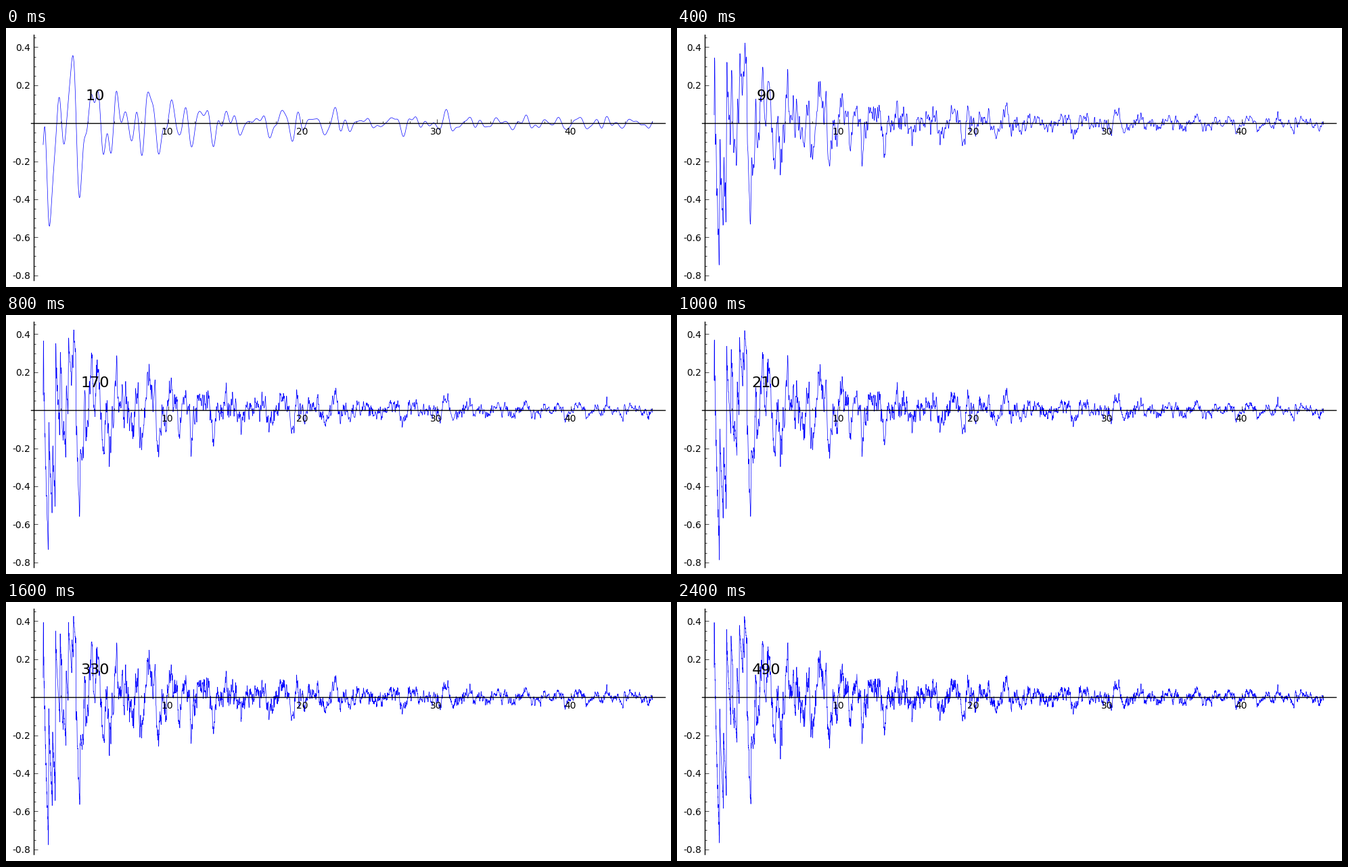
A matplotlib script that plays this animation: 983x384 px, repeating every 2600 ms.

```python
import numpy as np
import matplotlib.pyplot as plt
from matplotlib.animation import FuncAnimation
from matplotlib.ticker import MultipleLocator

WIDTH, HEIGHT, DPI = 983, 384, 100
CONDUCTOR = 433          # elliptic curve y^2 + xy = x^3 + 1, rank 2
RANK = 2
COUNTS = range(10, 500, 40)


def trace(p):
    """Trace of Frobenius at p, by counting points."""
    if p == 2:
        return -1
    x = np.arange(p, dtype=np.int64)
    chi = -np.ones(p, dtype=int)
    chi[x * x % p] = 1
    chi[0] = 0
    return -int(chi[(4 * x**3 + x**2 + 4) % p].sum())


def coefficients(limit):
    """Multiplicative coefficients a[0..limit] of the L-function."""
    a = np.ones(limit + 1)
    for p in range(2, limit + 1):
        if any(p % d == 0 for d in range(2, int(p**0.5) + 1)):
            continue
        ap = trace(p)
        before, now, q = 1, ap, p
        while q <= limit:
            n = np.arange(q, limit + 1, q)
            a[n[(n // q) % p != 0]] *= now
            before, now = now, ap * now - p * before
            q *= p
    return a


def zeros(count):
    """Heights of the first positive zeros on the critical line."""
    tilt, step, size = 0.05, 0.01, 2**17
    a = coefficients(2400)
    n = np.arange(1, len(a))
    # Mellin transform of the modular form along a ray close to the real axis
    z = np.exp(np.arange(0, 7.8, step) + 1j * (np.pi / 2 - tilt))
    form = np.exp(-2 * np.pi / np.sqrt(CONDUCTOR) * np.outer(z, n)) @ a[1:]
    g = z * form
    g[0] *= 0.5
    values = np.fft.ifft(g, size).real
    dt = 2 * np.pi / (size * step)
    t = np.arange(size) * dt
    keep = (t > 0.5) & (t < 300)
    t, values = t[keep], values[keep]
    i = np.nonzero(values[:-1] * values[1:] < 0)[0]
    roots = t[i] - values[i] * dt / (values[i + 1] - values[i])
    return roots[:count]


# Partial sums of the oscillating term, with u = log X up to X = 10^20
u = np.linspace(np.log(2), 20 * np.log(10), 5000)
gamma = zeros(max(COUNTS) - RANK)[:, None]
sums = np.cumsum(2 * np.sin(gamma * u) / gamma, axis=0) / u

fig = plt.figure(figsize=(WIDTH / DPI, HEIGHT / DPI), dpi=DPI, facecolor="white")
left, right, top, bottom = 36.9, 973.6, 10, 374.4
ax = fig.add_axes([left / WIDTH, 1 - bottom / HEIGHT,
                   (right - left) / WIDTH, (bottom - top) / HEIGHT])
pad = 0.02 * (u[-1] - u[0])
ax.set_xlim(u[0] - pad, u[-1] + pad)
ax.set_ylim(-0.8275, 0.4656)
ax.patch.set_visible(False)

for side in ("top", "right"):
    ax.spines[side].set_visible(False)
for side in ("left", "bottom"):
    ax.spines[side].set_position(("data", 0))
    ax.spines[side].set_linewidth(1)
for axis, major, minor in ((ax.xaxis, 10, 2), (ax.yaxis, 0.2, 0.05)):
    axis.set_major_locator(MultipleLocator(major))
    axis.set_minor_locator(MultipleLocator(minor))
for which, length in (("major", 4), ("minor", 2)):
    ax.tick_params(which=which, direction="in", length=length, width=0.5,
                   labelleft=False, labelbottom=False)


def label(text, xy, shift, size, ha, va):
    return ax.annotate(text, xy, shift, textcoords="offset points",
                       fontsize=size, ha=ha, va=va, family="DejaVu Sans",
                       color="black", annotation_clip=False)


for x in (10, 20, 30, 40):
    label(str(x), (x, 0), (-0.7, -4), 10, "center", "top")
for y in (0.4, 0.2, -0.2, -0.4, -0.6, -0.8):
    label(f"{y:.1f}", (0, y), (-3.4, 0), 10, "right", "center_baseline")

curve, = ax.plot([], [], color="blue", linewidth=0.5)
counter = label("", (np.log(100), 0.15), (-0.6, 0), 16, "center", "center_baseline")


def update(frame):
    count = COUNTS[frame]
    curve.set_data(u, sums[count - RANK - 1])
    counter.set_text(str(count))
    return curve, counter


anim = FuncAnimation(fig, update, frames=len(COUNTS), interval=200,
                     repeat=True, repeat_delay=0)
plt.show()
```
